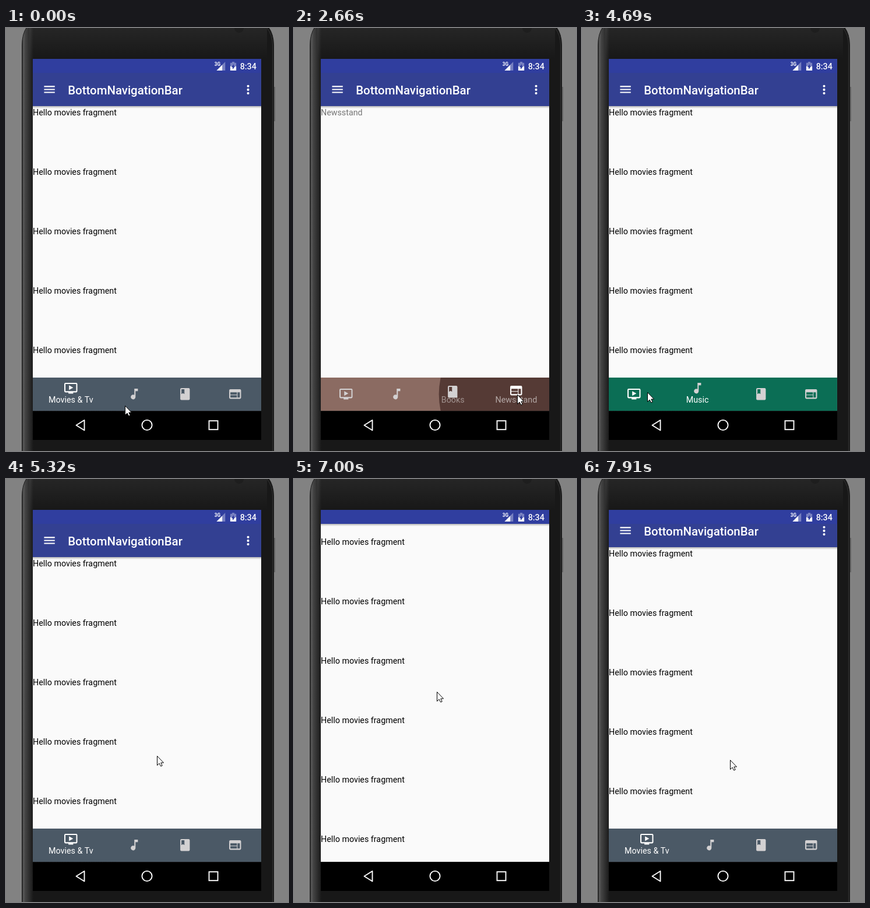
An HTML page for the animation above (8 s loop, 484 by 726 pixels).

```html
<!DOCTYPE html>
<html lang="en">
<head>
<meta charset="utf-8">
<title>Bottom navigation</title>
<style>
  html, body { margin: 0; width: 100%; height: 100%; overflow: hidden; background: #828282; }
  svg { display: block; font-family: Roboto, sans-serif; }
  text { white-space: pre; }
</style>
</head>
<body>
<svg width="484" height="726" viewBox="0 0 484 726">
  <defs>
    <linearGradient id="bezel" gradientUnits="userSpaceOnUse" x1="27" y1="0" x2="47" y2="0">
      <stop offset="0" stop-color="#111"/>
      <stop offset=".15" stop-color="#5a5a5a"/>
      <stop offset=".3" stop-color="#444"/>
      <stop offset="1" stop-color="#181818"/>
    </linearGradient>
    <linearGradient id="glow" x1="0" y1="0" x2="0" y2="1">
      <stop offset="0" stop-color="#fff" stop-opacity=".06"/>
      <stop offset="1" stop-color="#fff" stop-opacity="0"/>
    </linearGradient>
    <linearGradient id="shade" x1="0" y1="0" x2="0" y2="1">
      <stop offset="0" stop-color="#000" stop-opacity=".28"/>
      <stop offset="1" stop-color="#000" stop-opacity="0"/>
    </linearGradient>
    <clipPath id="screenClip"><rect width="384" height="592"/></clipPath>
    <clipPath id="barClip"><rect width="384" height="56"/></clipPath>
  </defs>

  <rect width="484" height="726" fill="#828282"/>
  <path d="M461 101v59" stroke="#444"/>
  <path d="M36 -2Q27.5 10 27.5 30V728H459.5V30Q459.5 10 450 -2Z" fill="url(#bezel)" stroke="#1b1b1b"/>
  <path d="M448 0Q457.5 12 457.5 30V726" fill="none" stroke="#333"/>
  <rect x="40" width="408" height="53" fill="url(#glow)"/>
  <circle cx="400" r="8" fill="#1e1e1e"/>
  <rect x="46" y="657" width="392" height="50" fill="#000"/>
  <g fill="none" stroke="#fff" stroke-width="1.9">
    <path d="M134.500 673V690.500L120.500 681.750Z" stroke-linejoin="round"/>
    <circle cx="242" cy="681.5" r="8.6"/>
    <rect x="348.5" y="674.2" width="15" height="15"/>
  </g>

  <!-- Screen, measured in dp -->
  <g transform="translate(46 53) scale(1.0208)" clip-path="url(#screenClip)">
    <rect width="384" height="592" fill="#fafafa"/>
    <g id="list" font-size="14"></g>
    <text id="page" y="95" font-size="14" fill="#757575"></text>
    <g id="nav">
      <g clip-path="url(#barClip)">
        <rect id="barBase" width="384" height="56"/>
        <circle id="reveal" cy="28"/>
      </g>
    </g>
    <g id="toolbar" fill="#fff">
      <rect y="79.35" width="384" height="4" fill="url(#shade)"/>
      <rect y="23.5" width="384" height="55.85" fill="#334092"/>
      <path transform="translate(16 39.4)" d="M3 18h18v-2H3zm0-5h18v-2H3zm0-7v2h18V6z"/>
      <text x="59" y="59.76" font-size="20" font-weight="500">BottomNavigationBar</text>
      <path d="M362 45.800v0m0 6v0m0 6v0" stroke="#fff" stroke-width="4" stroke-linecap="round"/>
    </g>
    <rect width="384" height="23.51" fill="#303e9f"/>
    <g fill="#fff">
      <text x="376" y="17.63" font-size="14" font-weight="500" text-anchor="end">8:34</text>
      <text x="305.5" y="11.76" font-size="8" font-weight="700">3G</text>
      <path d="M323.500 5V19.500H309Z" opacity=".35"/>
      <path d="M318.500 10V19.500H309Z"/>
      <path d="M335 5h4v1.500h3V19.500h-10V6.500h3z" opacity=".35"/>
      <path d="M332 12.500h10v7h-10z"/>
      <path d="M338 8.500v3.500h2.300L336 17.800V14h-2.300z" fill="#303e9f"/>
    </g>
  </g>

  <path id="cursor" d="M.5 .5V16.500L4 13L6.700 18L9.200 17L6.800 12H11.500Z" fill="#fff" stroke="#000" stroke-linejoin="round"/>
</svg>
<script>
const LOOP = 8000, STEP = 70, DP = 1.0208;
const BAR = 57, ROW = 102, TAB = 85, EXTRA = 43;
const DRAG_START = 5950, DRAG_Y = 499, LAG = 30;
const GREY = '#d3d1d2';

const $ = id => document.getElementById(id);
const ramp = (t, from, to) => Math.min(1, Math.max(0, (t - from) / (to - from)));
const easeOut = p => 1 - (1 - p) ** 2;
const snap = dp => Math.round(dp * DP) / DP;
const move = (el, x, y) => el.setAttribute('transform', `translate(${x} ${y})`);
const box = (x, y, w, h, r = 0) =>
  `M${x + r} ${y}h${w - 2 * r}q${r} 0 ${r} ${r}v${h - 2 * r}q0 ${r} ${-r} ${r}` +
  `h${2 * r - w}q${-r} 0 ${-r} ${-r}v${2 * r - h}q0 ${-r} ${r} ${-r}z`;

const tabs = [
  { label: 'Movies & Tv', color: '#4b5966',
    icon: box(1, 3, 22, 16, 2) + box(3, 5, 18, 12) + box(8, 19, 8, 2) + 'M9 7v8l7-4z' },
  { label: 'Music', color: '#0b6e55',
    icon: 'M12 3v10.5a4 4 0 1 0 2 3.5V7h4V3z' },
  { label: 'Books', color: '#8b6b62',
    icon: box(4, 2, 16, 20, 2) + 'M6 4h5v8l-2.5-1.5L6 12z' },
  { label: 'Newsstand', color: '#553a35',
    icon: box(2, 4, 20, 16, 2) + box(4, 9, 11, 4) + box(4, 14, 11, 4) + box(16, 9, 4, 9) }
];

// [time, tab]
const taps = [[0, 0], [700, 1], [1680, 2], [2590, 3], [3990, 1], [4690, 0]];

// Cursor glides: [start, end, x, y]
const glides = [
  [0, 0, 204, 648], [70, 420, 228, 620], [1120, 1470, 305, 622], [2100, 2380, 383, 629],
  [2660, 2870, 199, 656], [3150, 3570, 170, 633], [4200, 4480, 112, 625], [5040, 5320, 259, 475],
  [5390, 5880, 232, 508], [5950, 6300, 242, 417], [6300, 6720, 244, 354], [6930, 7770, 254, 484],
  [7770, 7910, 254, 482]
];

function cursorAt(t) {
  const n = glides.filter(g => g[0] <= t).length - 1;
  const [from, to, x, y] = glides[n];
  const [, , x0, y0] = glides[Math.max(0, n - 1)];
  const p = n ? ramp(t, from, to) : 1;
  return [x0 + (x - x0) * p, y0 + (y - y0) * p];
}

// The page follows the dragging cursor with a small delay.
function scrollAt(t) {
  return t <= DRAG_START ? 0 : Math.max(0, Math.round(DRAG_Y - cursorAt(t - LAG)[1]));
}

function add(parent, tag, attrs, text = '') {
  const el = document.createElementNS('http://www.w3.org/2000/svg', tag);
  for (const key in attrs) el.setAttribute(key, attrs[key]);
  el.textContent = text;
  return parent.appendChild(el);
}

for (let i = 0; i < 8; i++) add($('list'), 'text', { y: 95 + i * ROW / DP }, 'Hello movies fragment');
for (const tab of tabs) {
  tab.iconEl = add($('nav'), 'path', { d: tab.icon, 'fill-rule': 'evenodd' });
  tab.labelEl = add($('nav'), 'text', { 'font-size': 14, 'text-anchor': 'middle', fill: '#fff' }, tab.label);
}

function drawTabs(t) {
  const n = taps.filter(tap => tap[0] <= t).length - 1;
  const now = taps[n][1], old = n ? taps[n - 1][1] : now;
  const p = n ? ramp(t, taps[n][0], taps[n][0] + 210) : 1;
  const e = easeOut(p);

  let left = 0;
  tabs.forEach((tab, i) => {
    const active = i === now ? e : i === old ? 1 - e : 0;
    const width = TAB + EXTRA * active, mid = left + width / 2;
    left += width;
    move(tab.iconEl, snap(mid - 12), snap(16 - 10.5 * active));
    tab.iconEl.setAttribute('fill', i === now ? '#fff' : GREY);
    move(tab.labelEl, mid, snap(42));
    tab.labelEl.setAttribute('opacity', active);
    if (i === now) $('reveal').setAttribute('cx', mid);
  });

  $('barBase').setAttribute('fill', tabs[p < 1 ? old : now].color);
  $('reveal').setAttribute('fill', tabs[now].color);
  $('reveal').setAttribute('r', p * 390);
  $('list').setAttribute('visibility', now ? 'hidden' : 'visible');
  $('page').textContent = now ? tabs[now].label : '';
}

function draw(time) {
  const t = Math.floor((time % LOOP) / STEP) * STEP;
  drawTabs(t);

  const offset = scrollAt(t);
  move($('list'), 0, -offset / DP);
  move($('toolbar'), 0, -Math.min(offset, BAR) / DP);

  const hidden = easeOut(ramp(t, 5990, 6270)) - easeOut(ramp(t, 7070, 7350));
  move($('nav'), 0, snap(536 + BAR * hidden));

  const [x, y] = cursorAt(t);
  move($('cursor'), Math.round(x), Math.round(y));
}

const start = performance.now();
function tick() {
  draw(performance.now() - start);
  requestAnimationFrame(tick);
}
tick();
</script>
</body>
</html>
```
